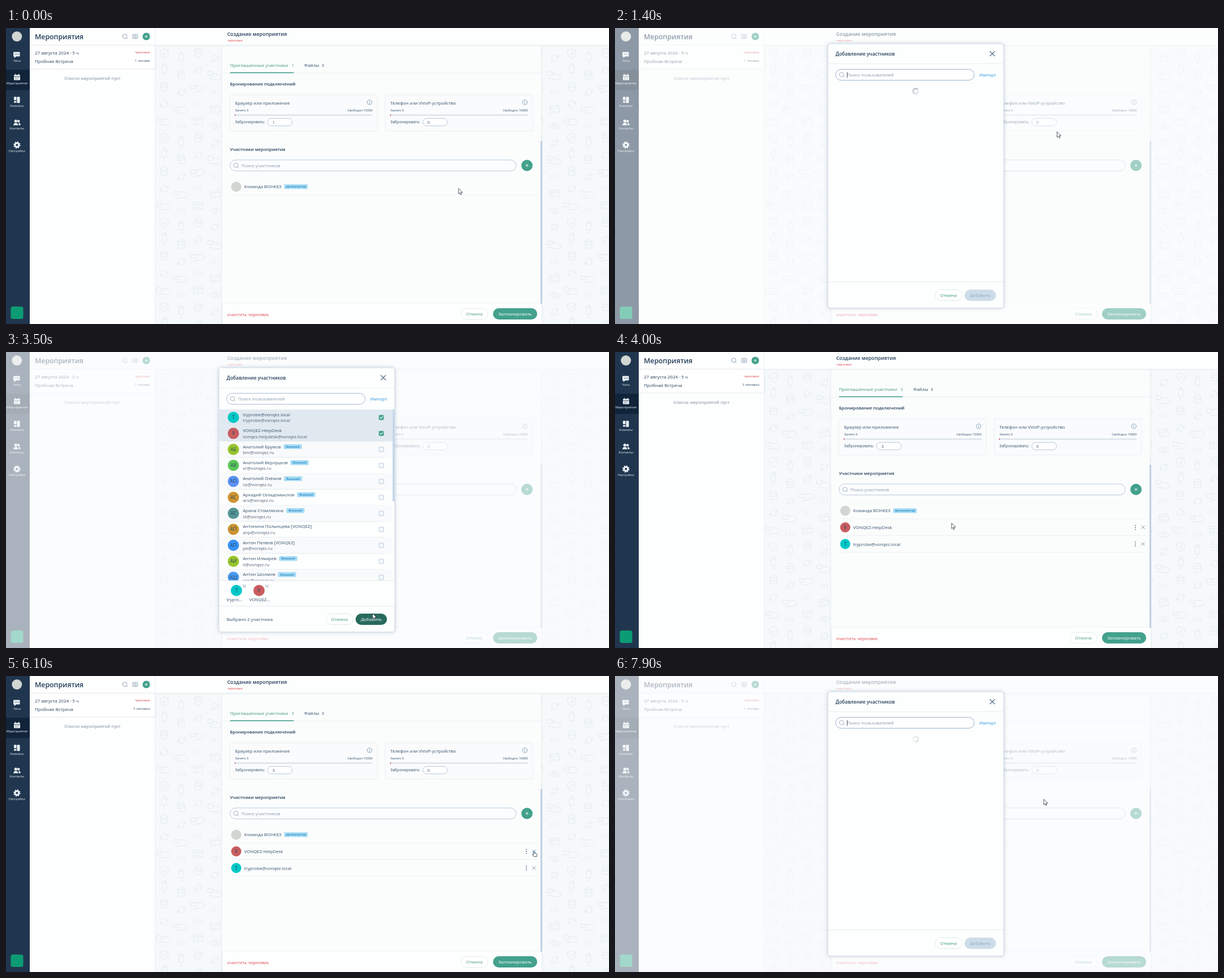
An HTML page that plays this animation: 1066 by 525 pixels, repeating every 8 s.

```html
<!DOCTYPE html>
<html lang="ru">
<head>
<meta charset="utf-8">
<title>Создание мероприятия</title>
<style>
  html, body { margin: 0; width: 100%; height: 100%; overflow: hidden; background: #fbfdfd; }
  svg { display: block; width: 1066px; height: 525px; font-family: "Open Sans", "Noto Sans", sans-serif; }
  text { white-space: pre; }
</style>
</head>
<body>
<svg id="stage" viewBox="0 0 1066 525"></svg>
<script>
const INK = '#344f6b', DARK = '#253f5a', GREEN = '#43a18c', DEEP = '#276a5c', RED = '#e0464f';
const LINE = '#e3e9ef', FIELD = '#a3bbd6', HINT = '#8498ad', BLUE = '#2196d8';
const TEAM = 'Команда ВОНКЕЗ', DESK = 'VONQEZ-HelpDesk', GUEST = 'tryprobe@vonqez.local';

const people = [
  [GUEST, GUEST, 'T', '#00c8c8'],
  [DESK, 'vonqez-helpdesk@vonqez.local', 'V', '#c95d60'],
  ['Анатолий Брумов', 'bm@vonqez.ru', 'АБ', '#96c62c', 1],
  ['Анатолий Верлуцков', 'vr@vonqez.ru', 'АВ', '#5cc75a', 1],
  ['Анатолий Озёмов', 'oz@vonqez.ru', 'АО', '#5c93f5', 1],
  ['Аркадий Сельдомыслов', 'ars@vonqez.ru', 'АС', '#cf9530', 1],
  ['Арина Стомлякина', 'st@vonqez.ru', 'АС', '#549694', 1],
  ['Антонина Полынцева [VONQEZ]', 'anp@vonqez.ru', 'АП', '#cc9431'],
  ['Антон Пелвов [VONQEZ]', 'pe@vonqez.ru', 'АП', '#3592f5'],
  ['Антон Илмарев', 'il@vonqez.ru', 'АИ', '#96c62c', 1],
  ['Антон Шолмов', 'ans@vonqez.ru', 'АШ', '#4a9cf0', 1],
];

// Drawing helpers
const text = (x, y, s, size = 7.8, fill = INK, extra = '') =>
  `<text x="${x}" y="${y}" font-size="${size}" fill="${fill}" ${extra}>${s}</text>`;
const MID = 'text-anchor="middle"', END = 'text-anchor="end"', SEMI = 'font-weight="600"';
const rect = (x, y, w, h, fill, r = 0, extra = '') =>
  `<rect x="${x}" y="${y}" width="${w}" height="${h}" rx="${r}" fill="${fill}" ${extra}/>`;
const circle = (x, y, r, fill, extra = '') => `<circle cx="${x}" cy="${y}" r="${r}" fill="${fill}" ${extra}/>`;
const path = (d, stroke, width = 1, fill = 'none') =>
  `<path d="${d}" fill="${fill}" stroke="${stroke}" stroke-width="${width}" stroke-linecap="round" stroke-linejoin="round"/>`;
const outline = (color, width = .8) => `stroke="${color}" stroke-width="${width}"`;
const hline = (x1, x2, y, color = LINE) => rect(x1, y - .4, x2 - x1, .8, color);
const cross = (x, y, r, color, w = .8) => path(`M${x - r} ${y - r}l${2 * r} ${2 * r}m0 ${-2 * r}l${-2 * r} ${2 * r}`, color, w);
const lens = (x, y, color) => path(`M${x - 3.8} ${y}a3.8 3.8 0 1 1 7.6 0a3.8 3.8 0 1 1-7.6 0m6.6 2.8l1.6 1.6`, color, .8);
const plus = (x, y, r, fill) => circle(x, y, r, fill) + path(`M${x - 2.3} ${y}h4.6M${x} ${y - 2.3}v4.6`, '#fff', .9);
const avatar = (x, y, r, letters, color) => circle(x, y, r, color) + text(x, y + 3, letters, 8.4, '#24455e', MID);
const pen = document.createElement('canvas').getContext('2d');
pen.font = '7.8px "Open Sans", "Noto Sans", sans-serif';
const badge = (name, x, y, label, w, size) => {
  const left = x + pen.measureText(name).width + 5;
  return rect(left, y, w, 8.4, '#a6dcf6', 1.2) + text(left + w / 2, y + 6.1, label, size, '#2585bd', MID + SEMI);
};

function wallpaper() {
  const icons = [
    'M0-8l7 3v5q0 6-7 9q-7-3-7-9v-5zM-3 0l2 3 4-5',
    'M-9-4l4 4-4 4m6-8 4 4-4 4m6-8 4 4-4 4',
    'M-6-6a6 2.5 0 1 0 12 0a6 2.5 0 1 0-12 0v11q6 4 12 0v-11M-6-1q6 4 12 0',
    'M-9 0q9-11 18 0q-9 11-18 0zM-3 0a3 3 0 1 0 6 0a3 3 0 1 0-6 0',
    'M-13-5h8v7h-8zM-5-3h8q8 0 8 5t-8 5h-13',
    'M-4-8h8v12h-8zM-2-8v-4h4v4M0 4v7',
    'M-8-6h16v12h-16zM-8-2h16M-5 3h5',
    'M-6 0a6 6 0 0 1 11-3m1-3v4h-4M6 0a6 6 0 0 1-11 3m-1 3v-4h4',
  ];
  let marks = '';
  for (let i = 0; i < 20; i++) {
    const col = i % 4, row = i >> 2;
    marks += `<g transform="translate(${16 + col * 30} ${16 + row * 30 + (col % 2 ? 7 : -2)}) rotate(${(i * 7 % 5 - 2) * 5})">`
      + path(icons[(i * 5 + row) % 8], '#e1e8ec', .9) + '</g>';
  }
  return `<pattern id="icons" x="264" y="31" width="120" height="150" patternUnits="userSpaceOnUse">${rect(0, 0, 120, 150, '#f6f9fa')}${marks}</pattern>`;
}

function sidebar() {
  const white = '#eaf0f5';
  const labels = [['Чаты', 59.5], ['Мероприятия', 99.7], ['Комнаты', 139.7], ['Контакты', 179.7], ['Настройки', 219.7]];
  return rect(0, 0, 42, 525, '#20364f') + rect(0, 74, 42, 36, '#11243a')
    + circle(19.3, 15, 9, '#d2d6d2')
    + labels.map(([s, y]) => text(19.3, y, s, 5.5, white, MID)).join('')
    + path('M14 43h10v7h-6l-3 2.5v-2.5h-1z', white, 1, white) + path('M16.5 46.5h.1m2.4 0h.1m2.4 0h.1', '#20364f', 1.3)
    + rect(14, 83, 11, 9.5, white, 1.3) + path('M16.5 82v2m6-2v2', white, 1.3) + hline(14, 25, 86, '#11243a')
    + path('M16.7 88.3h.1m2.6 0h.1m2.6 0h.1m-5.4 2h.1m2.6 0h.1', '#11243a', 1.1)
    + rect(19.5, 122, 5, 11, white, 1) + rect(14, 122, 4.5, 6, white, 1) + rect(14, 129.5, 4.5, 3, white, 1)
    + circle(17.3, 165, 2.6, white) + circle(22.2, 165.3, 2.2, white) + path('M13.5 172q0-3.5 3.8-3.5t3.8 3.5zm9 0h3q0-3.5-3-3.5', white, .6, white)
    + circle(19.3, 207.5, 3.4, 'none', outline(white, 3)) + circle(19.3, 207.5, 5.4, 'none', outline(white, 1.8) + 'stroke-dasharray="2.12"')
    + rect(8.5, 494, 22, 22, '#0c9c74', 3.5);
}

function eventsPanel() {
  return rect(42, 0, 222, 525, '#fdfefe')
    + rect(42, 31, 222, 40.5, '#fff', 0, 'filter="url(#soft)"') + hline(42, 264, 30.5) + rect(263.4, 0, .8, 525, LINE)
    + text(51, 19.5, 'Мероприятия', 12.3, DARK, SEMI)
    + lens(210, 14.7, '#6f88a3')
    + rect(224, 11.5, 8.6, 7.2, 'none', 1, outline('#6f88a3')) + path('M226 14h4.6m-4.6 2.3h4.6', '#6f88a3', .8)
    + plus(248, 15, 6.6, GREEN)
    + text(51, 46.7, '27 августа 2024 · 5 ч', 8, DARK) + text(255, 45.4, 'черновик', 5.8, RED, END)
    + text(51, 62.3, 'Пробная Встреча', 8, DARK)
    + text(153, 91.7, 'Список мероприятий пуст', 7.8, '#78889a', MID);
}

function bookingCard(x, title) {
  return rect(x, 118.4, 261, 64.3, '#f9fbfc', 3, outline('#e6ecf1'))
    + text(x + 9.5, 135.6, title)
    + circle(x + 247.3, 131.8, 4.2, 'none', outline('#6f8ba8')) + path(`M${x + 247.3} 131.5v2.3m0-4v.1`, '#6f8ba8', .9)
    + text(x + 9.5, 148.3, 'Занято 0', 5.6) + text(x + 252.5, 148.3, 'Свободно 10000', 5.6, INK, END)
    + rect(x + 9, 153.6, 243.5, 2, '#d5dfe8', 1) + rect(x + 9, 153.2, 1.2, 2.8, RED)
    + text(x + 9.5, 169.4, 'Забронировать:', 6.7)
    + rect(x + 67, 160.4, 43.5, 13.2, '#fff', 6.6, outline(FIELD));
}

function workspace() {
  return rect(264, 31, 802, 494, 'url(#icons)')
    + rect(382, 31, 564, 494, '#fbfdfd', 0, 'filter="url(#soft)"')
    + rect(264, 0, 802, 30, '#fdfefe', 0, 'filter="url(#soft)"')
    + text(391, 14, 'Создание мероприятия', 8.8, DARK, SEMI) + text(391, 24, 'черновик', 5.8, RED)
    + hline(383, 946, 80) + rect(396, 78.5, 112.5, 1.6, GREEN)
    + text(396, 69, 'Приглашенные участники', 8, '#3d947f')
    + text(527, 69, 'Файлы', 8) + text(558.5, 68.5, '0', 6.7)
    + text(396, 102.3, 'Бронирование подключений', 7.8, DARK, SEMI)
    + bookingCard(395.5, 'Браузер или приложение') + bookingCard(670, 'Телефон или VVoIP-устройство')
    + text(745, 169.6, '0', 7)
    + text(396, 218, 'Участники мероприятия', 7.8, DARK, SEMI)
    + rect(396, 234, 506, 19.6, '#fcfdfe', 9.8, outline(FIELD)) + lens(406.5, 243.5, HINT)
    + text(416, 247, 'Поиск участников', 7.8, HINT)
    + circle(407, 281.5, 9, '#d2d6d2') + text(421, 284.3, TEAM) + badge(TEAM, 421, 277.2, 'организатор', 41.5, 5.6)
    + hline(398, 938, 296, '#e9eef2')
    + rect(945, 200, 2.8, 289, '#bccde1')
    + rect(383, 489, 564, 36, '#fdfefe', 0, 'filter="url(#soft)"')
    + text(391, 510.5, 'очистить черновик', 7.8, RED)
    + rect(804.5, 497.4, 47.5, 19.2, '#fff', 9.6, outline('#dde7ea')) + text(828, 509.6, 'Отмена', 7.9, '#4a9b89', MID)
    + rect(861, 497, 78, 20, GREEN, 10) + text(900, 509.6, 'Запланировать', 7.9, '#fff', MID);
}

function memberRow([name, , letter, color], y, hot) {
  return avatar(407, y, 9, letter, color) + text(421, y + 3, name)
    + path(`M920 ${y - 3.5}v.1m0 3.4v.1m0 3.4v.1`, INK, 1.7) + cross(933.5, y, 2.6, hot ? BLUE : '#60788f')
    + hline(398, 938, y + 14.6, '#e9eef2');
}

// Parts of the page that follow the number of guests
function guestParts(guests, hot) {
  const rows = [people[0], people[1]].slice(0, guests).reverse();
  return text(255, 59.8, `${guests + 1} человек${guests ? 'а' : ''}`, 5.6, INK, END)
    + text(505, 68.5, guests + 1, 6.7, '#3d947f') + text(471, 169.6, guests + 1, 7)
    + rows.map((p, i) => memberRow(p, 311 + i * 29.5, hot && !i)).join('');
}

const modalFrame = rect(376.4, 28, 310.6, 468.5, '#fdfefe', 4, outline('#cbd9e5') + 'filter="url(#deep)"')
  + text(390, 49, 'Добавление участников', 8.5, DARK, SEMI) + cross(667, 45.5, 4.2, '#3a5876', 1.1)
  + hline(377, 687, 63.5) + text(644, 86.2, 'Импорт', 7.8, BLUE) + hline(377, 687, 450.5)
  + rect(566, 464.4, 47.5, 19.2, '#fff', 9.6, outline('#d8e6e6')) + text(589.5, 476.9, 'Отмена', 7.9, '#35947f', MID);

function searchField(focused, caret) {
  return rect(390, 73.3, 245, 19.4, '#fff', 9.7, outline(focused ? '#7d9dc2' : '#8faac8')) + lens(400.5, 82.7, HINT)
    + text(410, 86.2, 'Поиск пользователей', 7.8, HINT) + (caret ? rect(410, 78, .8, 10.5, DARK) : '');
}

function spinner(t, opacity) {
  let out = '';
  for (let i = 0; i < 12; i++)
    out += `<path d="M531.5 108.6v-2.4" transform="rotate(${i * 30} 531.5 112)" stroke="#4c5866" stroke-width="1.1" opacity="${.25 + .7 * ((i + 12 - t / 100 % 12) % 12) / 12}"/>`;
  return `<g opacity="${opacity}">${out}</g>`;
}

function listRow([name, mail, letters, color, external], i, lit, checked) {
  const y = 116 + 28.35 * i;
  return (lit ? rect(377, y - 14, 306.5, 28.2, '#e1e9f0') : i % 2 === 0 && i ? rect(377, y - 14, 306.5, 28.2, '#f9fafb') : '')
    + avatar(402, y, 10, letters, color)
    + text(418.7, y - 2.2, name) + text(418.7, y + 8.4, mail, 7.8, '#4b6178')
    + (external ? badge(name, 418.7, y - 9, 'Внешний', 32, 5) : '')
    + rect(659.4, y - 4, 8.2, 8.2, checked ? GREEN : '#f4f8fc', 1.7, outline(checked ? GREEN : '#a4bbd3'))
    + (checked ? path(`M661.3 ${y}l1.7 1.8 3-3.4`, '#fff', 1.1) : '')
    + hline(390, 670, y + 14.3, '#dfe6ec');
}

function chips(count) {
  if (!count) return '';
  return rect(377, 405.5, 309.5, 44.5, '#fdfefe') + hline(377, 687, 405.5)
    + people.slice(0, count).map(([name, , letter, color], i) => avatar(407.3 + 40 * i, 423, 10, letter, color)
      + cross(421.3 + 40 * i, 415.3, 2.5, '#60788f', .7) + text(390 + 40 * i, 441.5, name.slice(0, 6) + '...', 7.6)).join('')
    + text(390, 477.2, count > 1 ? 'Выбрано 2 участника' : 'Выбран 1 участник');
}

function modalParts(t, age) {
  const first = t < 4000;
  const chosen = !first || t < 2100 ? 0 : t < 2500 ? 1 : 2;
  const ready = first && t >= 2300, hover = first && t >= 3400;
  let out = searchField(!chosen, age < 800);
  if (age < 600) out += spinner(t, Math.min(1, (600 - age) / 200));
  else {
    const lit = [t >= 1700, t >= 2400], checked = [t >= 2300, t >= 2600];
    out += `<g clip-path="url(#list)">${people.map((p, i) => listRow(p, i, lit[i], checked[i])).join('')}</g>`
      + rect(683.5, 102, 3.2, 163, '#c0d3e8') + chips(chosen);
  }
  return out + rect(618, 464, 55.5, 20, hover ? DEEP : ready ? GREEN : '#cddce8', 10)
    + text(645.7, 476.9, 'Добавить', 7.9, ready ? '#fff' : '#8da9c0', MID);
}

const shadow = (id, dy, blur, alpha) =>
  `<filter id="${id}" x="-20%" y="-30%" width="140%" height="160%"><feDropShadow dx="0" dy="${dy}" stdDeviation="${blur}" flood-color="#5f7f9c" flood-opacity="${alpha}"/></filter>`;

document.getElementById('stage').innerHTML = `<defs>${wallpaper()}${shadow('soft', .5, 1.5, .22)}${shadow('deep', 0, 3, .4)}
  <clipPath id="list">${rect(377, 102, 310, 348, '#000')}</clipPath></defs>
  ${workspace()}${eventsPanel()}${sidebar()}<g id="guests"></g><g id="addButton"></g>
  ${rect(0, 0, 1066, 525, '#fbfcfd', 0, 'id="veil"')}
  <g id="modal">${modalFrame}<g id="modalBody"></g></g>
  <g id="cursor">
    ${`<g id="arrow">${path('M0 0v9.3l2.2-2 1.5 3.4 1.6-.7-1.5-3.3h3z', '#26313d', .8, '#fff')}</g>`}
    ${`<g id="hand">${path('M-.9 1q.9-1.2 1.8 0v3.3l3.6.9q1 .4.8 1.6l-.7 3.6h-4.7l-2.7-3.9q.4-1.1 1.9 0z', '#26313d', .8, '#fff')}</g>`}
  </g>`;

const el = id => document.getElementById(id);
const cache = {};
function setHTML(id, html) {
  if (cache[id] !== html) el(id).innerHTML = cache[id] = html;
}

// Pointer path: time, x, y
const route = [
  [0, 800, 285], [600, 919, 242], [1000, 919, 242], [1100, 898, 252], [1700, 665, 117], [2200, 666, 115.5], [2300, 666, 115.5],
  [2500, 663, 143], [2600, 663, 143], [3400, 648, 464], [3600, 648, 464], [4000, 595, 304], [4400, 500, 330],
  [4800, 560, 428], [5300, 800, 402], [6000, 933.5, 310], [6700, 933.5, 310], [6800, 950, 300], [7200, 920, 241],
  [7400, 920, 241], [7900, 758, 219], [8000, 740, 210],
];
const handTimes = [[600, 1000], [1700, 2700], [6000, 6700], [7200, 7400]];
const within = (t, [from, to]) => t >= from && t <= to;
const clamp = v => Math.max(0, Math.min(1, v));

function pointer(t) {
  const i = route.findIndex(k => k[0] > t);
  const [t0, x0, y0] = route[i - 1], [t1, x1, y1] = route[i];
  const u = (t - t0) / (t1 - t0), e = u * u * (3 - 2 * u);
  return [x0 + (x1 - x0) * e, y0 + (y1 - y0) * e];
}

function draw(now) {
  const t = Math.floor(now % 8000 / 100) * 100;
  const age = t < 7000 ? t - 1000 : t - 7400;
  const closing = t < 7000 ? clamp((3800 - t) / 200) : 1;
  const modalOpacity = clamp((age + 50) / 100) * closing;

  const guests = t < 3700 || t >= 6600 ? 0 : t < 6200 ? 2 : 1;
  setHTML('guests', guestParts(guests, within(t, [6000, 6700])));
  const pressed = within(t, [600, 1200]) || within(t, [7200, 7500]);
  setHTML('addButton', plus(921, 243.7, 10, pressed ? DEEP : GREEN));

  el('veil').setAttribute('opacity', .63 * clamp((age - 20) / 480) * closing);
  el('modal').setAttribute('opacity', modalOpacity);
  if (modalOpacity) setHTML('modalBody', modalParts(t, age));

  const hand = handTimes.some(span => within(t, span));
  el('arrow').setAttribute('visibility', hand ? 'hidden' : 'visible');
  el('hand').setAttribute('visibility', hand ? 'visible' : 'hidden');
  el('cursor').setAttribute('transform', `translate(${pointer(t)})`);
}

const start = performance.now();
function tick() {
  draw(performance.now() - start);
  requestAnimationFrame(tick);
}
tick();
</script>
</body>
</html>
```
